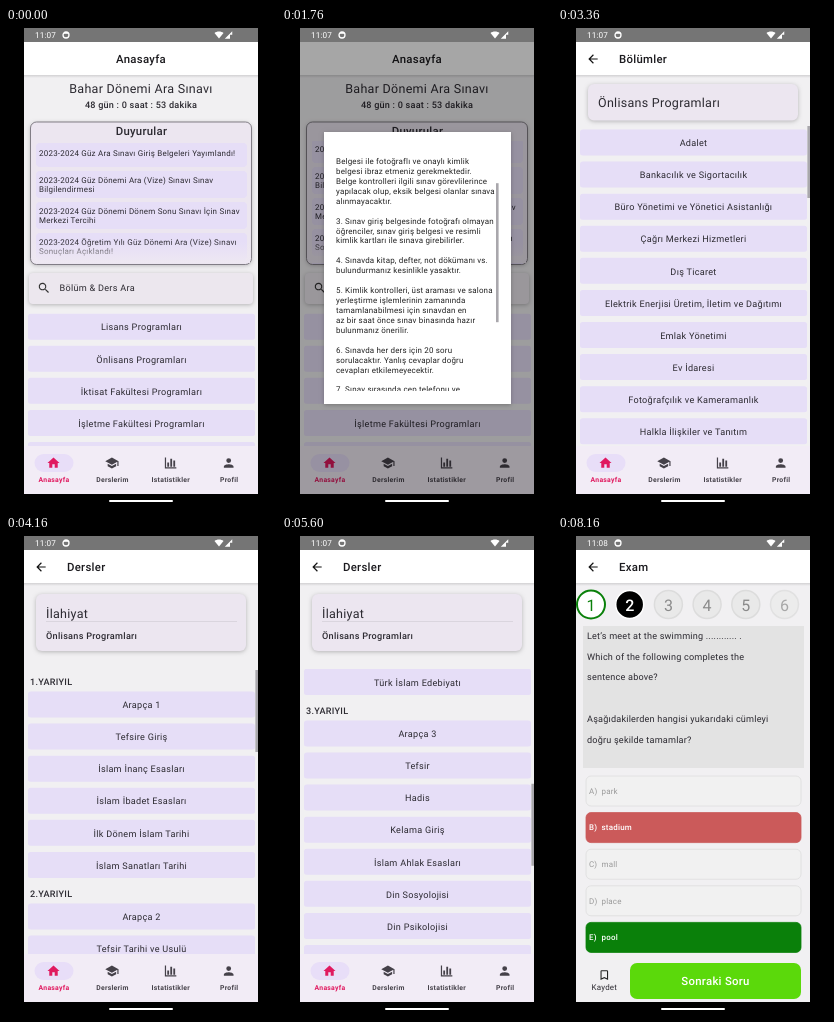
Animation, 270 px wide and 480 px high, one loop 8.32 s. Source, as an HTML page with a canvas:

```html
<!DOCTYPE html>
<html lang="tr">
<head>
<meta charset="utf-8">
<style>
html, body { margin: 0; height: 100%; overflow: hidden; background: #000; }
canvas { display: block; }
</style>
</head>
<body>
<canvas id="stage" width="270" height="480"></canvas>
<script>
const ctx = document.getElementById('stage').getContext('2d');
const LOOP = 8320, STEP = 160, PITCH = 32.08;
const INK = '#2c2a31', LILAC = '#e6def7', CARD = '#ece6f0', PAGE = '#f1f0f2', PINK = '#e0195f';

const HOME_MENU = ['Lisans Programları', 'Önlisans Programları', 'İktisat Fakültesi Programları',
  'İşletme Fakültesi Programları', 'Açıköğretim Programları'];
const NEWS = [
  ['2023-2024 Güz Ara Sınavı Giriş Belgeleri Yayımlandı!'],
  ['2023-2024 Güz Dönemi Ara (Vize) Sınavı Sınav', 'Bilgilendirmesi'],
  ['2023-2024 Güz Dönemi Dönem Sonu Sınavı İçin Sınav', 'Merkezi Tercihi'],
  ['2023-2024 Öğretim Yılı Güz Dönemi Ara (Vize) Sınavı', 'Sonuçları Açıklandı!'],
  ['2023-2024 Güz Dönemi Kayıt Yenileme Duyurusu']];
const RULES = `1. Güz Yarıyılı Ara Sınavı 09-10 Aralık 2023
tarihinde yüz yüze olacaktır.

2. Sınava girebilmeniz için Sınav Giriş
Belgesi ile fotoğraflı ve onaylı kimlik
belgesi ibraz etmeniz gerekmektedir.
Belge kontrolleri ilgili sınav görevlilerince
yapılacak olup, eksik belgesi olanlar sınava
alınmayacaktır.

3. Sınav giriş belgesinde fotoğrafı olmayan
öğrenciler, sınav giriş belgesi ve resimli
kimlik kartları ile sınava girebilirler.

4. Sınavda kitap, defter, not dökümanı vs.
bulundurmanız kesinlikle yasaktır.

5. Kimlik kontrolleri, üst araması ve salona
yerleştirme işlemlerinin zamanında
tamamlanabilmesi için sınavdan en
az bir saat önce sınav binasında hazır
bulunmanız önerilir.

6. Sınavda her ders için 20 soru
sorulacaktır. Yanlış cevaplar doğru
cevapları etkilemeyecektir.

7. Sınav sırasında cep telefonu ve
elektronik cihaz kullanılamaz.`.split('\n');
const BACHELOR = ['Türk Dili ve Edebiyatı', 'Okulöncesi Öğretmenliği', 'İngilizce Öğretmenliği', 'Felsefe',
  'Tarih', 'Sosyoloji', 'Halkla İlişkiler ve Reklamcılık', 'Sağlık Yönetimi', 'Sosyal Hizmet',
  'Yönetim Bilişim Sistemleri'];
const ASSOCIATE = ['Adalet', 'Bankacılık ve Sigortacılık', 'Büro Yönetimi ve Yönetici Asistanlığı',
  'Çağrı Merkezi Hizmetleri', 'Dış Ticaret', 'Elektrik Enerjisi Üretim, İletim ve Dağıtımı',
  'Emlak Yönetimi', 'Ev İdaresi', 'Fotoğrafçılık ve Kameramanlık', 'Halkla İlişkiler ve Tanıtım',
  'İlahiyat', 'İnsan Kaynakları Yönetimi', 'İşletme Yönetimi', 'Kültürel Miras ve Turizm',
  'Lojistik', 'Marka İletişimi'];
const COURSES = [
  ['Arapça 1', 'Tefsire Giriş', 'İslam İnanç Esasları', 'İslam İbadet Esasları',
    'İlk Dönem İslam Tarihi', 'İslam Sanatları Tarihi'],
  ['Arapça 2', 'Tefsir Tarihi ve Usulü', 'Hadis Tarihi ve Usulü', 'İslam Hukukuna Giriş',
    'İslam Kurumları ve Medeniyeti', 'Türk İslam Edebiyatı'],
  ['Arapça 3', 'Tefsir', 'Hadis', 'Kelama Giriş', 'İslam Ahlak Esasları', 'Din Sosyolojisi',
    'Din Psikolojisi', 'İngilizce 1'],
  ['Arapça 4', 'Kelam', 'İslam Hukuku', 'Tasavvuf', 'İslam Felsefesi', 'Dinler Tarihi',
    'Din Eğitimi', 'İngilizce 2']];
const QUESTIONS = [
  { text: ['A: Are you ............ ?', 'B: No, I’m married.', 'Which of the following completes the',
      'dialogue above?', '', 'Aşağıdakilerden hangisi yukarıdaki', 'konuşmayı doğru şekilde tamamlar?'],
    options: ['single', 'new', 'one', 'different', 'first'], pick: 0, right: 0 },
  { text: ['Let’s meet at the swimming ............ .', 'Which of the following completes the',
      'sentence above?', '', 'Aşağıdakilerden hangisi yukarıdaki cümleyi', 'doğru şekilde tamamlar?'],
    options: ['park', 'stadium', 'mall', 'place', 'pool'], pick: 1, right: 4 }];

const ICONS = {
  home: 'M10 20v-6h4v6h5v-8h3L12 3 2 12h3v8z',
  school: 'M5 13.2v4L12 21l7-3.8v-4L12 17zM12 3L1 9l11 6 9-4.9V17h2V9z',
  chart: 'M3 3h2v16h17v2H3zM7 11h3v7H7zM12 5h3v13h-3zM17 8h3v10h-3z',
  person: 'M12 12a4 4 0 1 0 0-8 4 4 0 0 0 0 8zm0 2c-2.7 0-8 1.3-8 4v2h16v-2c0-2.7-5.3-4-8-4z',
  search: 'M15.5 14h-.8l-.3-.3A6.5 6.5 0 1 0 13.7 14.4l.3.3v.8l5 5 1.5-1.5zm-6 0a4.5 4.5 0 1 1 0-9 4.5 4.5 0 0 1 0 9z',
  back: 'M20 11H7.8l5.6-5.6L12 4l-8 8 8 8 1.4-1.4L7.8 13H20z',
  mark: 'M17 3H7a2 2 0 0 0-2 2v16l7-3 7 3V5a2 2 0 0 0-2-2zm0 15l-5-2.2L7 18V5h10z',
  wifi: 'M12 21L0 6.5C3 4 7 2.5 12 2.5S21 4 24 6.5z',
  signal: 'M2 22h14V11h6V2z'
};
for (const k in ICONS) ICONS[k] = new Path2D(ICONS[k]);

// y is the middle of the capitals
function text(s, x, y, { size = 9.1, color = INK, align = 'left', weight = 400, gap = 0.284 } = {}) {
  ctx.font = `${weight} ${size}px Roboto, sans-serif`;
  ctx.textRendering = 'geometricPrecision';
  ctx.letterSpacing = gap + 'px';
  ctx.textAlign = align;
  ctx.fillStyle = color;
  ctx.fillText(s, x, y + size * 0.355);
}

function rect(x, y, w, h, fill, r = 0, stroke, line = 1) {
  ctx.beginPath();
  ctx.roundRect(x, y, w, h, r);
  ctx.fillStyle = fill;
  ctx.fill();
  if (!stroke) return;
  ctx.strokeStyle = stroke;
  ctx.lineWidth = line;
  ctx.stroke();
}

function raised(...args) {
  ctx.save();
  ctx.shadowColor = 'rgba(0,0,0,.25)';
  ctx.shadowBlur = 4;
  ctx.shadowOffsetY = 1;
  rect(...args);
  ctx.restore();
}

function icon(name, x, y, size, color) {
  ctx.save();
  ctx.translate(x - size / 2, y - size / 2);
  ctx.scale(size / 24, size / 24);
  ctx.fillStyle = color;
  ctx.fill(ICONS[name], 'evenodd');
  ctx.restore();
}

function clip(x, y, w, h, draw) {
  ctx.save();
  ctx.beginPath();
  ctx.rect(x, y, w, h);
  ctx.clip();
  draw();
  ctx.restore();
}

function shade(y0, y1, from, to, x = 18, w = 234) {
  const g = ctx.createLinearGradient(0, y0, 0, y1);
  g.addColorStop(0, from);
  g.addColorStop(1, to);
  rect(x, y0, w, y1 - y0, g);
}

// eased value through [time, value] points
function track(t, points) {
  let [t0, v0] = points[0];
  for (const [t1, v1] of points) {
    if (t < t1) {
      const p = Math.max(0, (t - t0) / (t1 - t0));
      return v0 + (v1 - v0) * p * p * (3 - 2 * p);
    }
    [t0, v0] = [t1, v1];
  }
  return v0;
}

function button(label, y) {
  rect(22, y - 13.5, 227, 26, LILAC, 2.5);
  text(label, 135.5, y, { align: 'center' });
}

const thumb = (x, y, h) => rect(x, y, 2.6, h, '#a9a7ac');

function frame(t) {
  rect(0, 0, 270, 480, '#000');
  rect(18, 0, 234, 466, PAGE);
  rect(18, 0, 234, 14, '#757575');
  text(t < 7360 ? '11:07' : '11:08', 29, 7.3, { size: 8.2, color: '#fff', gap: 0.1 });
  ctx.beginPath();
  ctx.arc(60, 7, 3, 0, 7);
  ctx.strokeStyle = '#fff';
  ctx.lineWidth = 1.3;
  ctx.stroke();
  rect(58, 4, 4, 1.8, '#fff');
  icon('wifi', 213, 7, 9, '#fff');
  icon('signal', 222.5, 7, 9, '#fff');
  rect(103, 472, 64, 2, '#fff', 1);
}

function appBar(title, back = true) {
  rect(18, 14, 234, 33, '#fff');
  shade(47, 50, 'rgba(0,0,0,.13)', 'rgba(0,0,0,0)');
  const style = { size: 11.38, weight: 500, color: '#1c1b1f' };
  if (back) {
    icon('back', 35, 31, 14, '#111');
    text(title, 61, 31, style);
  } else text(title, 135, 31, { ...style, align: 'center' });
}

function navBar() {
  rect(18, 418, 234, 48, '#f2ecf6');
  rect(28.5, 426, 39, 18, '#e8def8', 9);
  const tabs = [['home', 'Anasayfa'], ['school', 'Derslerim'], ['chart', 'Istatistikler'], ['person', 'Profil']];
  tabs.forEach(([name, label], i) => {
    const x = 48 + i * 58.4, color = i ? '#454149' : PINK;
    icon(name, x - 0.5, 435, 14.5, color);
    text(label, x, 452, { size: 6.83, weight: 700, align: 'center', color });
  });
}

function home(t) {
  text('Bahar Dönemi Ara Sınavı', 135, 61, { size: 12.5, align: 'center' });
  text('48 gün : 0 saat : 53 dakika', 135, 77, { weight: 500, align: 'center', gap: 0.22 });
  raised(24.5, 94, 221, 142.5, CARD, 6);
  rect(24.5, 94, 221, 142.5, CARD, 6, '#69656d', 0.8);
  text('Duyurular', 135.5, 102.7, { size: 11.38, weight: 500, align: 'center' });
  clip(26, 113, 218, 123, () => {
    let y = 115 - track(t, [[160, 0], [480, 20], [800, 4]]);
    for (const lines of NEWS) {
      const h = lines.length > 1 ? 27 : 24;
      rect(30, y, 211, h, LILAC, 4);
      lines.forEach((s, i) => text(s, 33, y + (h === 24 ? 10 : 9) + i * 9.5, { size: 7.97, gap: 0.23 }));
      y += h + 4;
    }
    shade(214, 235, 'rgba(238,232,242,0)', 'rgba(238,232,242,.95)', 27, 217);
  });
  raised(23, 245, 224, 31, '#ece7ee', 4);
  icon('search', 38, 260, 14, '#333');
  text('Bölüm & Ders Ara', 53.5, 260);
  HOME_MENU.forEach((s, i) => button(s, 299.2 + i * PITCH));
  appBar('Anasayfa', false);
  navBar();
}

function modal(t) {
  rect(18, 14, 234, 452, 'rgba(0,0,0,.35)');
  const scroll = track(t, [[1280, 0], [1760, 40]]);
  raised(42, 104, 187, 272, '#fff');
  clip(42, 128, 187, 235, () =>
    RULES.forEach((s, i) => text(s, 54, 133.5 + i * 9.93 - scroll, { size: 7.97, gap: 0.18, color: '#222' })));
  thumb(214, 132 + scroll * 0.58, 139);
}

function programs(title, items, scroll, bar) {
  clip(18, 98, 234, 320, () => {
    items.forEach((s, i) => button(s, 115 + i * PITCH - scroll));
    if (bar) thumb(249.4, 98 + scroll * 0.225, 72);
  });
  raised(30, 56, 210, 36.5, CARD, 6);
  text(title, 40, 74.5, { size: 12.5 });
  appBar('Bölümler');
  navBar();
}

function courses(t) {
  const scroll = track(t, [[4160, 0], [4640, 158], [5280, 395]]);
  clip(18, 133, 234, 285, () => {
    let y = 146 - scroll;
    COURSES.forEach((list, i) => {
      text(`${i + 1}.YARIYIL`, 24, y, { weight: 500 });
      list.forEach((s, j) => button(s, y + 23 + j * PITCH));
      y += 19.5 + list.length * PITCH;
    });
    thumb(249.4, 134 + scroll * 0.288, 82);
  });
  raised(30, 58, 210, 57, CARD, 6);
  text('İlahiyat', 40, 77.5, { size: 12.5 });
  rect(40, 85, 191, 0.7, '#d5cfd9');
  text('Önlisans Programları', 40, 99.5, { weight: 500 });
  appBar('Dersler');
  navBar();
}

function exam(index, picked, done) {
  const q = QUESTIONS[index];
  appBar('Exam');
  for (let i = 0; i < 6; i++) {
    const x = 33 + i * 38.7, now = i === index, passed = i < index;
    ctx.globalAlpha = i === 5 ? 0.7 : 1;
    rect(x - 14, 54.5, 28, 28, now ? '#000' : passed ? '#fff' : '#e9e9e9', 14,
      now ? '#fff' : passed ? '#0a800a' : '#dcdcdc', passed ? 2 : 1.5);
    text(i + 1, x, 69, { size: 16, gap: 0, align: 'center', weight: now ? 500 : 400,
      color: now ? '#fff' : passed ? '#0a800a' : '#8a8a8a' });
  }
  ctx.globalAlpha = 1;
  rect(25, 90, 221, 142, '#e3e3e3');
  q.text.forEach((s, i) => text(s, 29, 99.7 + i * 20.75, { gap: 0.2 }));
  q.options.forEach((s, i) => {
    const y = 240 + i * 36.6, mine = picked && i === q.pick;
    let fill = '#f1f1f1';
    if (done && i === q.right) fill = '#0a800a';
    else if (done && mine) fill = '#cb5a5a';
    else if (mine) fill = '#777';
    const plain = fill === '#f1f1f1';
    rect(28, y, 215, 30, fill, 5, plain ? '#dedede' : fill, 0.8);
    const style = { size: 7.97, gap: 0.2, weight: plain ? 400 : 500, color: !plain ? '#fff' : done ? '#999' : INK };
    text('ABCDE'[i] + ')', 31, y + 15, style);
    text(s, 43.5, y + 15, style);
  });
  icon('mark', 46.3, 439, 13, '#222');
  text('Kaydet', 46.3, 451.5, { size: 7.97, gap: 0.2, align: 'center' });
  rect(72, 427, 171, 36, done ? '#5bd90b' : '#d9b108', 7);
  text(done ? 'Sonraki Soru' : 'Cevapla', 157.5, 444.5,
    { size: 11.38, weight: 500, color: '#fff', align: 'center' });
}

function draw(t) {
  frame(t);
  if (t < 2240) {
    home(t);
    if (t >= 960 && t < 1920) modal(t);
  } else if (t < 2880) programs('Lisans Programları', BACHELOR, 0, false);
  else if (t < 3200) home(t);
  else if (t < 4160) programs('Önlisans Programları', ASSOCIATE, track(t, [[3520, 0], [4000, 110]]), true);
  else if (t < 6080) courses(t);
  else if (t < 7360) exam(0, t >= 6560, t >= 6880);
  else exam(1, t >= 7840, t >= 8160);
}

function tick() {
  const t = performance.now() % LOOP;
  draw(Math.floor(t / STEP) * STEP);
  requestAnimationFrame(tick);
}
tick();
</script>
</body>
</html>
```
